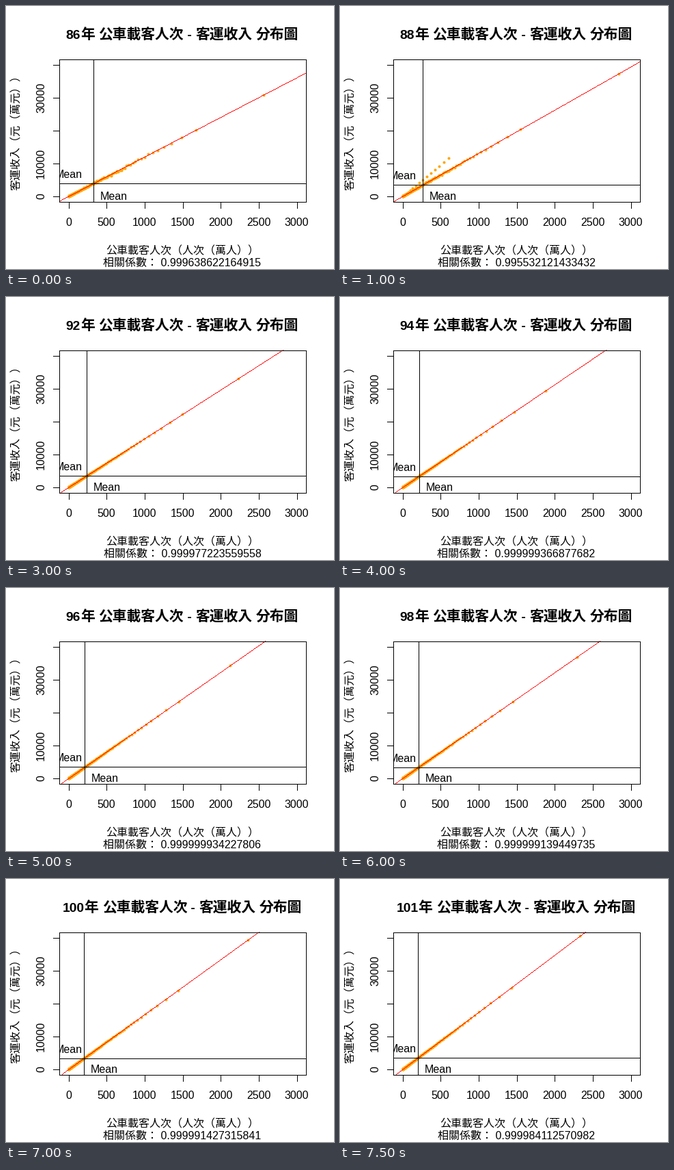
A matplotlib script that plays this animation: 480 by 384 pixels, repeating every 8 s.

```python
import numpy as np
import matplotlib.pyplot as plt
from matplotlib.animation import FuncAnimation
from matplotlib.patches import Rectangle

W, H, DPI = 480, 384, 96
PX = 72 / DPI  # points per pixel
LATIN, CJK = "Liberation Sans", "Noto Sans CJK JP"
LEFT, RIGHT, TOP, BOTTOM = 78, 439, 78, 286
X0, Y0 = 92, 278.3  # data origin in pixels
CENTRE = 258
FIRST, LAST = 86, 101

# key years: x where the fit meets the top, mean x, mean y, largest x, correlation
KEYS = {
    86: (478, 128, 259, 377, 0.999638622164915),
    88: (445.7, 121, 261, 408, 0.995532121433432),
    90: (402.5, 120, 260, 381, 0.999948856151637),
    93: (406.5, 117, 262, 320, 0.999991407263518),
    94: (389, 116, 262, 301, 0.999999366877682),
    96: (379.5, 115, 261, 328, 0.999999934227806),
    99: (381, 115, 262, 356, 0.9999987420607),
    101: (359, 114, 261, 351, 0.999984112570982),
}


def state(year):
    return [np.interp(year, list(KEYS), col) for col in zip(*KEYS.values())]


fig = plt.figure(figsize=(W / DPI, H / DPI), dpi=DPI, facecolor="white")
ax = fig.add_axes([0, 0, 1, 1])
ax.set(xlim=(0, W), ylim=(H, 0))
ax.axis("off")


def label(x, y, s, size=16, ha="center", **kw):
    kw.setdefault("family", [LATIN, CJK])
    return ax.text(x, y, s, fontsize=size * PX, ha=ha, va="baseline",
                   rotation_mode="anchor", **kw)


def stroke(xs, ys, z=4):
    return ax.plot(xs, ys, color="black", lw=PX, antialiased=False, zorder=z)[0]


# frame, ticks and fixed labels
stroke([LEFT, RIGHT, RIGHT, LEFT, LEFT], [TOP, TOP, BOTTOM, BOTTOM, TOP], z=5)
for v in range(0, 3001, 500):
    x = int(X0 + v * 0.11142)
    stroke([x, x], [BOTTOM, BOTTOM + 9])
    label(x - 0.5, 321, str(v))
for v in range(0, 40001, 10000):
    y = int(Y0 - v * 0.0048)
    stroke([LEFT - 9, LEFT], [y, y])
    if v in (0, 10000, 30000):
        label(56, y - 0.5, str(v), rotation=90)
label(CENTRE, 362, "公車載客人次（人次（萬人））")
label(20, 181, "客運收入（元（萬元））", rotation=90)

# title, laid out as runs of the two fonts
TITLE_LATIN, TITLE_CJK = 19.2, 20.8
EM = {" ": 0.278, "-": 0.333}
RUNS = ["", "年", " ", "公車載客人次", " - ", "客運收入", " ", "分布圖"]


def is_cjk(s):
    return s > "\u2000"


def advance(s):
    if is_cjk(s):
        return TITLE_CJK * len(s)
    return TITLE_LATIN * sum(EM.get(c, 0.556) for c in s)


title = [label(0, 48, run, TITLE_CJK if is_cjk(run) else TITLE_LATIN, "left",
               family=CJK if is_cjk(run) else LATIN, weight="bold")
         for run in RUNS]

# moving parts
clip = Rectangle((LEFT, TOP), RIGHT - LEFT, BOTTOM - TOP, transform=ax.transData)
dots, = ax.plot([], [], "o", color="#ffa500", ms=4 * PX, mew=0,
                antialiased=False, zorder=2)
fit, = ax.plot([], [], ",", color="red", zorder=3)  # one pixel per column
vline = stroke([], [])
hline = stroke([], [])
mean_x = label(0, 283, "Mean", clip_on=True)
mean_y = label(X0 - 0.5, 0, "Mean", clip_on=True)
corr = label(CENTRE, 380, "")
for part in (mean_x, mean_y):
    part.set_clip_path(clip)


def points(year, slope, mean, largest):
    # long-tailed spread by rank, with scatter that fades over the years
    rank = np.arange(1, 171)
    dx = (18 + 0.3 * (mean - X0)) * np.log(170 / rank) ** 1.25
    dx[0] = largest - X0
    noise = np.random.default_rng(7).normal(size=dx.size)
    dy = slope * dx + 0.7 + 1.1 * 0.75 ** (year - FIRST) * noise * np.clip(dx / 60, 0, 1)
    if year == 88:  # a second, steeper group
        branch = 8 + 59 * np.linspace(0, 1, 12) ** 1.3
        dx, dy = np.append(dx, branch), np.append(dy, 0.836 * branch)
    return X0 + dx, Y0 - dy


def update(i):
    year = FIRST + i
    top, mx, my, largest, r = state(year)
    slope = (Y0 - TOP) / (top - X0)
    dots.set_data(*points(year, slope, mx, largest))

    xs = np.arange(LEFT, RIGHT + 1)
    ys = Y0 - slope * (xs - X0)
    inside = (ys >= TOP) & (ys <= BOTTOM)
    fit.set_data(xs[inside], ys[inside])

    mx, my = round(mx), round(my)
    vline.set_data([mx, mx], [TOP, BOTTOM])
    hline.set_data([LEFT, RIGHT], [my, my])
    mean_x.set_x(mx + 29.5)
    mean_y.set_y(my - 8.4)
    corr.set_text(f"相關係數： {r:.15g}")

    runs = [str(year)] + RUNS[1:]
    x = CENTRE - sum(map(advance, runs)) / 2
    for text, run in zip(title, runs):
        text.set_text(run)
        text.set_x(x)
        x += advance(run)
    return [dots, fit, vline, hline, mean_x, mean_y, corr, *title]


anim = FuncAnimation(fig, update, frames=LAST - FIRST + 1, init_func=lambda: update(0),
                     interval=500, repeat=True, repeat_delay=0)
plt.show()
```
